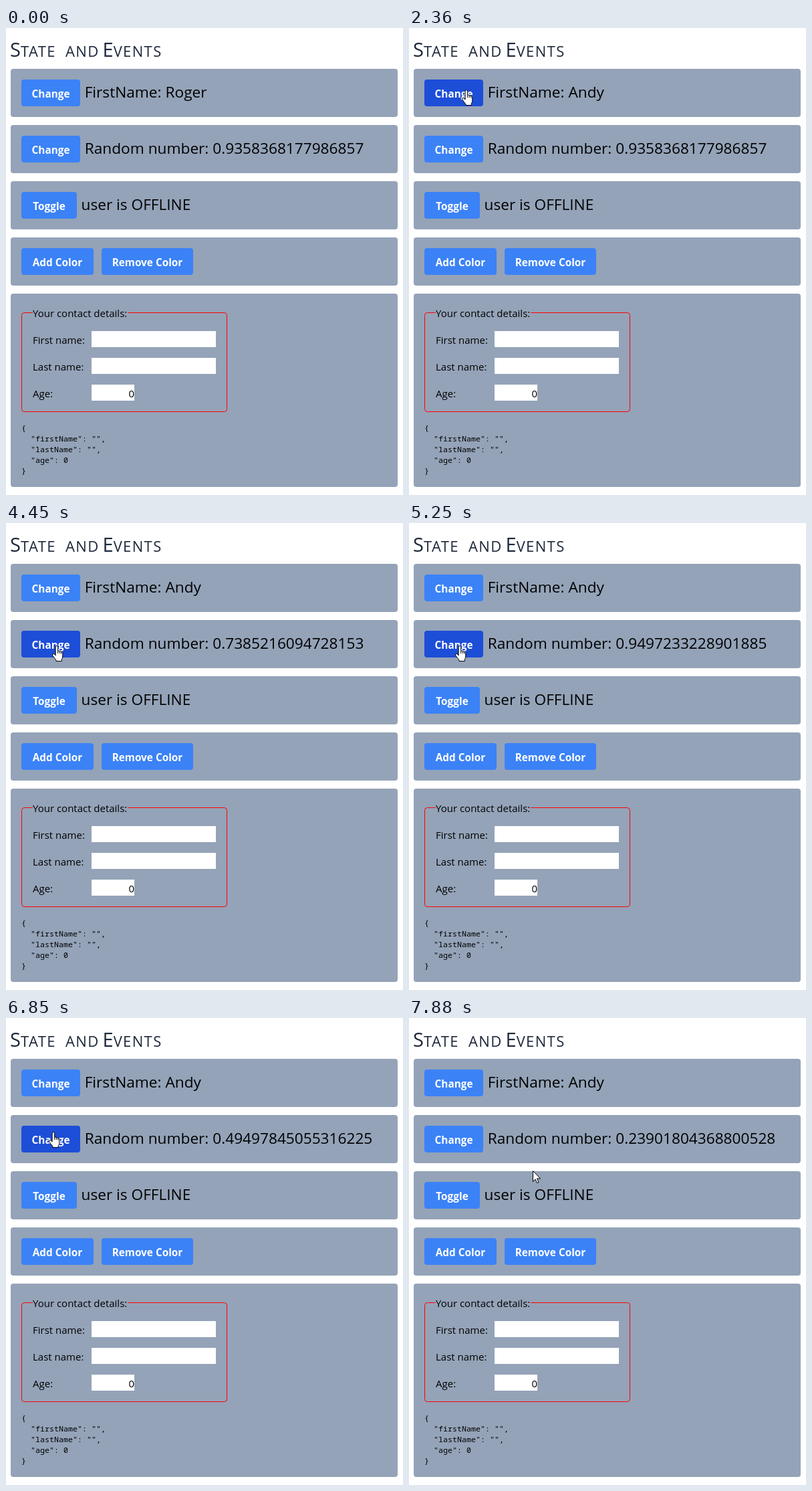
An HTML page for the animation above (8000 ms loop, 594 by 698 pixels).

```html
<!DOCTYPE html>
<html lang="en">
<head>
<meta charset="utf-8">
<title>State and Events</title>
<style>
  html, body { margin: 0; width: 100%; height: 100%; overflow: hidden; background: #fff; }
  svg { display: block; width: 594px; height: 698px; font-family: "Open Sans", "Noto Sans", sans-serif; }
  text { white-space: pre; }
  .card { fill: #94a3b8; }
  .btn rect { fill: #3b82f6; }
  .btn.hover rect { fill: #1d4ed8; }
  .btn text { fill: #fff; font-size: 15.35px; font-weight: 700; text-anchor: middle; }
  .big { font-size: 22.65px; }
  .label { font-size: 15px; }
  .title { font-size: 29px; fill: #1e293b; }
  .title tspan { font-size: 22px; letter-spacing: 1.35px; }
  .code { font: 500 11.67px "Noto Sans Mono", monospace; }
  .pointer { fill: #fff; stroke: #000; stroke-linejoin: round; }
  #beam { fill: none; stroke: #444; }
</style>
</head>
<body>
<svg viewBox="0 0 594 698">
  <g class="title">
    <text x="6" y="43">S<tspan>TATE</tspan></text>
    <text x="89" y="43"><tspan>AND</tspan></text>
    <text x="144.500" y="43">E<tspan>VENTS</tspan></text>
  </g>
  <g id="cards"></g>
  <g id="buttons"></g>
  <g class="big">
    <text id="name" x="117.700" y="104"></text>
    <text id="number" x="117.700" y="188"></text>
    <text x="112.600" y="272">user is OFFLINE</text>
  </g>
  <rect x="23.500" y="425.500" width="307" height="148" rx="4" fill="none" stroke="#f00"/>
  <rect class="card" x="40" y="420" width="142" height="12"/>
  <g fill="#fff">
    <rect x="128" y="453" width="186" height="24"/>
    <rect x="128" y="493" width="186" height="24"/>
    <rect x="128" y="533" width="64" height="24"/>
  </g>
  <g class="label">
    <text x="40" y="432">Your contact details:</text>
    <text x="40" y="472">First name:</text>
    <text x="40" y="512">Last name:</text>
    <text x="40" y="552">Age:</text>
    <text x="192" y="552" text-anchor="end">0</text>
  </g>
  <g class="code">
    <text x="23" y="602">{</text>
    <text x="37" y="618">"firstName": "",</text>
    <text x="37" y="634">"lastName": "",</text>
    <text x="37" y="650">"age": 0</text>
    <text x="23" y="666">}</text>
  </g>
  <g id="cursor">
    <path id="arrow" class="pointer" d="M.5.5V16.500L4 13L6.600 18.500L9 17.500L6.500 12H11.500Z"/>
    <path id="hand" class="pointer" d="M-1.900 15V2.400a1.800 1.800 0 0 1 3.600 0V8.500a1.500 1.500 0 0 1 2.600 .6a1.500 1.500 0 0 1 2.500 .8a1.300 1.300 0 0 1 2 1.100V17q0 2-1.500 3.500V23.500H-1V22q-2.500-3-5-6.700a1.700 1.700 0 0 1 2.600-2.200zM1.700 8.500V12M4.300 9.100V12M6.800 9.900V12.500"/>
    <path id="beam" d="M-3.500-8h2q1 0 1 1V7q0 1-1 1h-2M2.500-8h-2q-1 0-1 1M2.500 8h-2q-1 0-1-1"/>
  </g>
</svg>
<script>
const LOOP = 8000;
const $ = id => document.getElementById(id);

function add(parent, tag, attrs, text = '') {
  const el = document.createElementNS('http://www.w3.org/2000/svg', tag);
  for (const key in attrs) el.setAttribute(key, attrs[key]);
  el.textContent = text;
  return parent.appendChild(el);
}

// Cards: top, height
for (const [y, height] of [[61, 72], [145, 72], [229, 72], [313, 72], [397, 289]])
  add($('cards'), 'rect', { class: 'card', x: 7, y, width: 579, height, rx: 4 });

// Buttons: label, left, top, width
const buttons = [
  ['Change', 23, 77, 88],
  ['Change', 23, 161, 88],
  ['Toggle', 23, 245, 83],
  ['Add Color', 23, 329, 108],
  ['Remove Color', 143, 329, 137]
].map(([label, x, y, width]) => {
  const g = add($('buttons'), 'g', { class: 'btn' });
  add(g, 'rect', { x, y, width, height: 40, rx: 4 });
  add(g, 'text', { x: x + width / 2, y: y + 27 }, label);
  return g;
});

const names = [[0, 'Roger'], [2360, 'Andy']];
const numbers = [
  [0, '0.9358368177986857'],
  [4020, '0.4172960358213746'],
  [4450, '0.7385216094728153'],
  [4850, '0.2641908357190643'],
  [5250, '0.9497233228901885'],
  [6330, '0.81736420958172036'],
  [6850, '0.49497845055316225'],
  [7310, '0.23901804368800528']
];

// Cursor: time, shape, x, y
const moves = [
  [0, ''],
  [870, 'arrow', 271, 581],
  [1003, 'arrow', 232, 470],
  [1136, 'arrow', 190, 352],
  [1269, 'arrow', 150, 250],
  [1402, 'arrow', 121, 170],
  [1535, 'hand', 104, 114],
  [1668, 'hand', 92, 100],
  [1800, 'hand', 86, 92],
  [2501, 'hand', 87, 93],
  [2643, 'hand', 88, 96],
  [2784, 'hand', 90, 101],
  [2926, 'hand', 95, 108],
  [3067, 'hand', 102, 114],
  [3209, 'arrow', 110, 123],
  [3350, 'arrow', 114, 132],
  [3470, 'beam', 117, 172],
  [3620, 'hand', 76, 183],
  [5516, 'hand', 76, 184],
  [5782, 'hand', 76, 186],
  [6048, 'hand', 76, 187],
  [6180, 'hand', 76, 188],
  [6330, 'hand', 71, 170],
  [7453, 'hand', 78, 178],
  [7595, 'hand', 100, 192],
  [7738, 'arrow', 150, 214],
  [7880, 'arrow', 185, 228]
];

const stepAt = (steps, t) => steps.findLast(step => step[0] <= t);

function setText(id, text) {
  if ($(id).textContent !== text) $(id).textContent = text;
}

function draw(t) {
  setText('name', 'FirstName: ' + stepAt(names, t)[1]);
  setText('number', 'Random number: ' + stepAt(numbers, t)[1]);
  const [, shape, x = 0, y = 0] = stepAt(moves, t);
  $('cursor').setAttribute('transform', `translate(${x} ${y})`);
  for (const id of ['arrow', 'hand', 'beam'])
    $(id).style.display = id === shape ? '' : 'none';
  buttons[0].classList.toggle('hover', shape === 'hand' && y < 140);
  buttons[1].classList.toggle('hover', shape === 'hand' && y > 140);
}

const start = performance.now();
function tick() {
  draw((performance.now() - start) % LOOP);
  requestAnimationFrame(tick);
}
tick();
</script>
</body>
</html>
```
